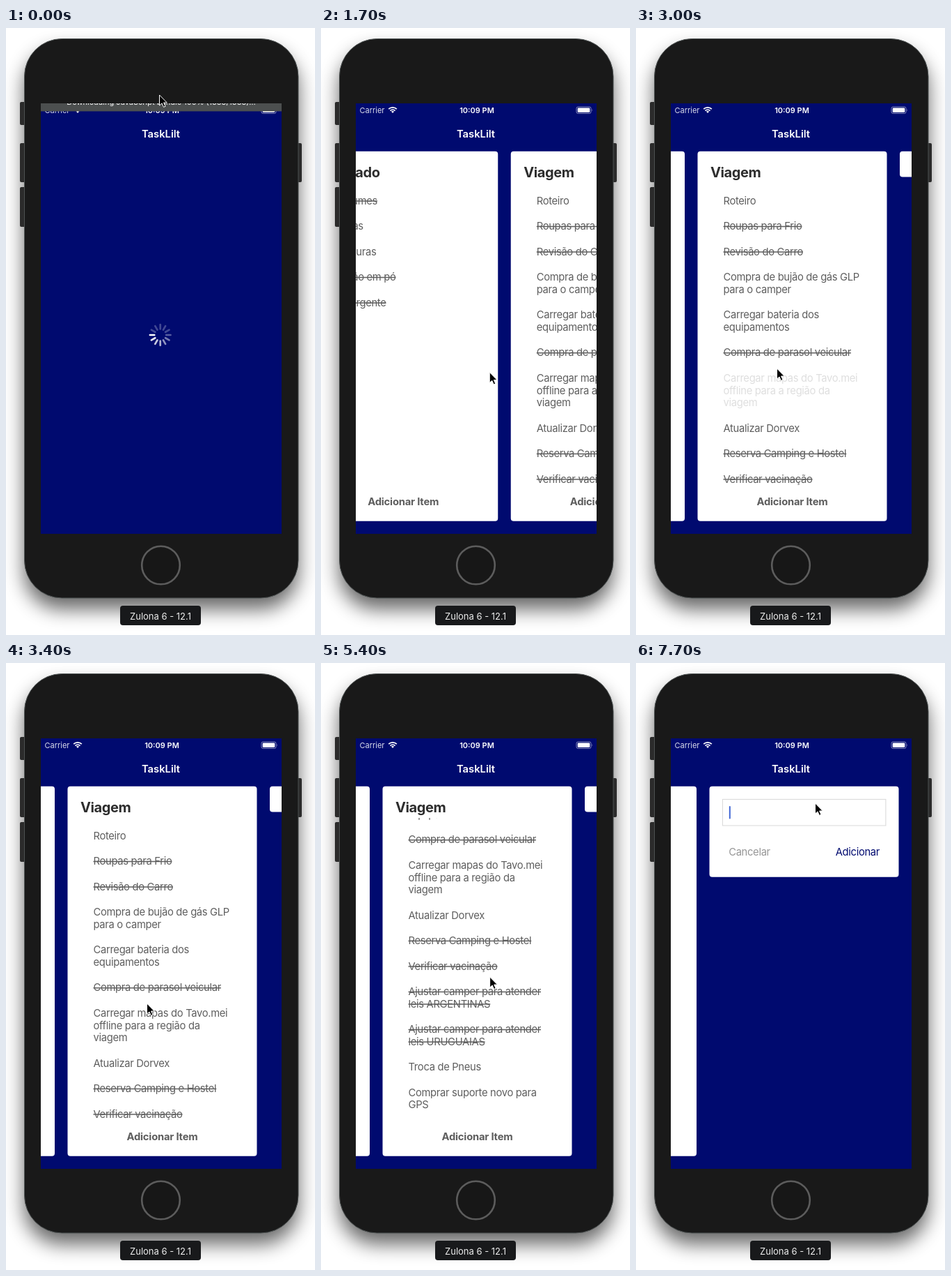
Recreate the animation shown at these times as an HTML page. Size 444 px wide and 870 px high, loop 8000 ms.

```html
<!DOCTYPE html>
<html lang="pt">
<head>
<meta charset="utf-8">
<title>Lista</title>
<style>
html, body { margin: 0; width: 100%; height: 100%; overflow: hidden; background: #fff; }
svg { display: block; width: 100vw; height: 100vh; }
text { font: 14.76px Inter, sans-serif; letter-spacing: -.32px; fill: #5e5e5e; white-space: pre; }
.title { font-size: 20px; font-weight: 700; letter-spacing: -.4px; fill: #2d2d2d; }
.add { font-weight: 700; letter-spacing: -.2px; text-anchor: middle; }
.head { font-weight: 600; letter-spacing: 0; fill: #fff; text-anchor: middle; }
.bar { font-size: 11px; letter-spacing: 0; fill: #fff; }
.label { font-size: 13px; letter-spacing: 0; fill: #eee; text-anchor: middle; }
.mid { text-anchor: middle; }
.end { text-anchor: end; }
.navy { fill: #000a6f; }
.done { text-decoration: line-through; }
</style>
</head>
<body>
<svg viewBox="0 0 444 870">
  <defs>
    <filter id="blur" x="-20%" y="-20%" width="140%" height="140%"><feGaussianBlur stdDeviation="14"/></filter>
    <clipPath id="screen"><rect x="50" y="108" width="346" height="617"/></clipPath>
    <clipPath id="rows"><rect x="0" y="222" width="1000" height="439"/></clipPath>
  </defs>
  <rect x="26" y="32" width="394" height="801" rx="54" opacity=".6" filter="url(#blur)"/>
  <g fill="#2b2b2b">
    <rect x="20" y="106" width="9" height="33" rx="2"/>
    <rect x="20" y="165" width="9" height="56" rx="2"/>
    <rect x="20" y="228" width="9" height="57" rx="2"/>
    <rect x="416" y="165" width="9" height="56" rx="2"/>
  </g>
  <rect x="26.5" y="15.5" width="393.5" height="801.5" rx="54" fill="#191919" stroke="#4d5252"/>
  <circle cx="222.5" cy="770" r="27.3" fill="#171717" stroke="#5c5c5c" stroke-width="2.6"/>
  <rect x="164" y="828" width="116" height="28" rx="4" fill="#18191b"/>
  <text class="label" x="222" y="848">Zulona 6 - 12.1</text>

  <g clip-path="url(#screen)">
    <rect class="navy" x="50" y="108" width="346" height="617"/>
    <text class="bar" x="55.5" y="121.5" opacity=".85">Carrier</text>
    <g fill="none" stroke="#fff" stroke-width="1.8">
      <path d="M97.2 116.2a8.2 8.2 0 0 1 11.6 0M99.5 118.6a5 5 0 0 1 7 0"/>
      <path d="M103 122l-2-2.2a2.9 2.9 0 0 1 4 0z" fill="#fff" stroke="none"/>
    </g>
    <text class="bar mid" x="224" y="121.5" font-weight="600" style="font-weight:600">10:09 PM</text>
    <rect x="367" y="113" width="21" height="9.5" rx="2.4" fill="none" stroke="#fff" stroke-opacity=".5"/>
    <rect x="368.7" y="114.6" width="17.6" height="6.3" rx="1.2" fill="#fff"/>
    <path d="M389.4 116.2q1.6 1.5 0 3z" fill="#fff" opacity=".5"/>
    <text class="head" x="222.5" y="156.7">TaskLilt</text>
    <g id="spinner"></g>
    <g id="cards"></g>
    <g id="loader">
      <rect x="50" y="101" width="346" height="18.5" fill="#4c4f4f"/>
      <text class="bar mid" x="223" y="110">Downloading JavaScript bundle 100% (1333/1333)…</text>
    </g>
  </g>
  <path id="cursor" d="M0 0V15L3.5 11.9 6 17.4 8.5 16.3 6.1 11H10.8Z" stroke="#fff" stroke-linejoin="round"/>
</svg>
<script>
const $ = id => document.getElementById(id);
const LOOP = 8000, LEFT = 68.5, WIDTH = 272, STEP = 290.5, LINE = 17.6;

// A leading "-" marks a finished item, "/" breaks a line
const market = ['-Legumes', 'Frutas', 'Verduras', '-Sabão em pó', '-Detergente'];
const travel = ['Roteiro', '-Roupas para Frio', '-Revisão do Carro',
  'Compra de bujão de gás GLP/para o camper', 'Carregar bateria dos/equipamentos',
  '-Compra de parasol veicular', 'Carregar mapas do Tavo.mei/offline para a região da/viagem',
  'Atualizar Dorvex', '-Reserva Camping e Hostel', '-Verificar vacinação',
  '-Ajustar camper para atender/leis ARGENTINAS', '-Ajustar camper para atender/leis URUGUAIAS',
  'Troca de Pneus', 'Comprar suporte novo para/GPS'];

const text = (x, y, s, cls = '') => `<text x="${x}" y="${y}" class="${cls}">${s}</text>`;
const box = (x, h) => `<rect x="${x}" y="176.7" width="${WIDTH}" height="${h}" rx="4" fill="#fff"/>`;

function list(x, title, items, id) {
  let y = 252.7;
  const rows = items.map((item, i) => {
    const lines = item.replace(/^-/, '').split('/');
    const cls = item[0] === '-' ? 'done' : '';
    const row = lines.map((s, n) => text(x + 37, y + n * LINE, s, cls)).join('');
    y += 18.9 + lines.length * LINE;
    return `<g id="${id}${i}">${row}</g>`;
  }).join('');
  return box(x, 530) + text(x + 18.5, 214.4, title, 'title') +
    `<g clip-path="url(#rows)"><g id="${id}">${rows}</g></g>` +
    text(x + WIDTH / 2, 684.3, 'Adicionar Item', 'add');
}

const third = LEFT + 2 * STEP;
$('cards').innerHTML = list(LEFT, 'Mercado', market, 'market') + list(LEFT + STEP, 'Viagem', travel, 'travel') +
  `<g id="button">${box(third, 36.7)}${text(third + WIDTH / 2, 200.3, 'Adicioinar Lista', 'mid navy')}</g>
  <g id="form">${box(third, 130)}
    <rect x="${third + 18.9}" y="195.4" width="234.5" height="37.6" fill="#fff" stroke="#d8d8d8"/>
    <rect x="${third + 28.3}" y="205" width="2" height="18.5" rx="1" fill="#4267d6"/>
    <g opacity=".65">${text(third + 27.7, 275.6, 'Cancelar')}</g>
    ${text(third + 244.5, 275.6, 'Adicionar', 'end navy')}
  </g>`;

$('spinner').innerHTML = [...Array(12).keys()].map(i =>
  `<path d="M0-8.5V-14.8" transform="translate(221.7 440) rotate(${i * 30})" stroke="#fff" stroke-width="2.7" stroke-linecap="round"/>`).join('');

const smooth = p => p * p * (3 - 2 * p);
const out = p => 1 - (1 - p) ** 3;

// Keys are [time, value, easing into this key]
function at(keys, t) {
  const i = keys.findIndex(k => k[0] > t);
  if (i < 0) return keys[keys.length - 1][1];
  if (i === 0) return keys[0][1];
  const [t0, a] = keys[i - 1], [t1, b, ease = smooth] = keys[i];
  return a + (b - a) * ease((t - t0) / (t1 - t0));
}

const cursorX = [[600, 220.5], [1050, 323.5], [1200, 323.5], [1400, 328.5], [2100, 110.5], [2350, 110.5], [2900, 202.5],
  [3800, 202.5], [4050, 204.5], [5200, 204.5], [5850, 372], [6030, 372], [6280, 119.5], [6450, 119.5], [7050, 257.5]];
const cursorY = [[600, 96], [1050, 481], [1400, 482], [2100, 511], [2350, 511], [2900, 488], [3800, 488],
  [4050, 453], [5200, 453], [5850, 440], [6030, 440], [6280, 427], [6450, 427], [7050, 201]];
const swipe = [[1400, 0], [2100, 218], [2600, 270.5, out], [6030, 270.5], [6300, 570.5], [6900, 544]];
const scroll = [[3800, 0], [4200, 181.7], [4950, 212, out]];
const itemPress = [[2850, 1], [2980, .2], [3150, .2], [3400, 1]];
const buttonPress = [[7250, 1], [7380, .2]];

const show = (id, on) => $(id).style.display = on ? '' : 'none';
const move = (id, x, y) => $(id).setAttribute('transform', `translate(${x} ${y})`);

function draw(t) {
  const loading = t < 350;
  show('spinner', loading);
  show('cards', !loading);
  show('loader', t < 200);
  move('loader', 0, -t * .09);
  const lead = 9 + Math.floor(t / 1000 * 12);
  [...$('spinner').children].forEach((s, i) =>
    s.setAttribute('opacity', Math.max(.25, 1 - ((lead - i + 24) % 12) * .11)));

  move('cards', -at(swipe, t), 0);
  move('travel', 0, -at(scroll, t));
  $('travel6').setAttribute('opacity', at(itemPress, t));
  $('button').setAttribute('opacity', at(buttonPress, t));
  show('button', t < 7500);
  show('form', t >= 7500);
  move('cursor', at(cursorX, t), at(cursorY, t));
}

const start = performance.now();
(function tick() {
  draw((performance.now() - start) % LOOP);
  requestAnimationFrame(tick);
})();
</script>
</body>
</html>
```
